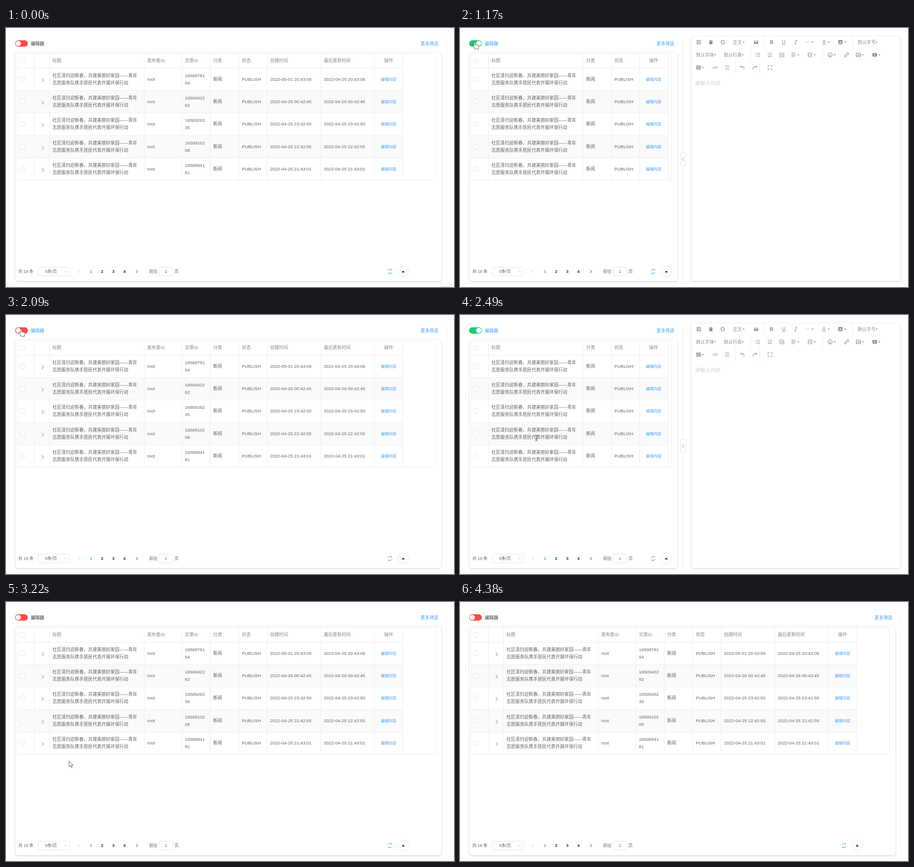
An HTML page that plays this animation: 984 px wide and 569 px high, repeating every 4560 ms.

```html
<!DOCTYPE html>
<html lang="zh">
<head>
<meta charset="utf-8">
<title>文章管理</title>
<style>
html, body { margin: 0; width: 100%; height: 100%; overflow: hidden; background: #fff; }
svg { display: block; width: 984px; height: 569px; font-family: "Liberation Sans", "Noto Sans CJK SC", "Noto Sans CJK", sans-serif; }
text { white-space: pre; }
.card { fill: #fff; stroke: #f0f1f4; stroke-width: .7; filter: drop-shadow(0 1px 1.3px rgba(0,0,0,.2)); }
.grid { fill: none; stroke: #ebeef5; }
.box { fill: #fff; stroke: #dcdfe6; stroke-width: .8; }
.line { fill: none; stroke-width: 1; }
.icons { fill: none; stroke: #8c8c8c; stroke-width: 1.1; }
.icons .solid { fill: #8c8c8c; stroke: none; }
.pointer { fill: #fff; stroke: #444; stroke-width: .9; stroke-linejoin: round; }
</style>
</head>
<body>
<svg id="stage" viewBox="0 0 984 569"></svg>
<script>
const LOOP = 4560;
const BODY = '#606266', HEAD = '#85888e', BLUE = '#409eff', DARK = '#303133', PALE = '#c0c4cc';
const TITLE = ['社区清扫迎新春，共建美丽好家园——青年', '志愿服务队携手居民代表开展环保行动'];
const ROWS = [
  ['1650878154', '2022-05-01 20:43:09', '2022-04-25 20:43:06'],
  ['1650942262', '2022-04-26 00:42:45', '2022-04-26 00:42:45'],
  ['1650926235', '2022-04-25 23:42:50', '2022-04-25 23:42:50'],
  ['1650910208', '2022-04-25 22:42:55', '2022-04-25 22:42:55'],
  ['1650894181', '2022-04-25 21:43:01', '2022-04-25 21:43:01']
];
const rowTop = i => 88 + Math.round(i * 49.2);

// Markup helpers
const text = (x, mid, str, { size = 9.8, fill = BODY, anchor = 'start', weight = 400, style = 'normal' } = {}) =>
  `<text x="${x}" y="${mid + size * .37}" font-size="${size}" fill="${fill}" text-anchor="${anchor}" font-weight="${weight}" font-style="${style}">${str}</text>`;
const rect = (x, y, w, h, cls, r = 0) => `<rect class="${cls}" x="${x}" y="${y}" width="${w}" height="${h}" rx="${r}"/>`;
const path = (d, stroke) => `<path class="line" d="${d}" stroke="${stroke}"/>`;
const chevron = (x, y, dx, dy, stroke) => path(dx
  ? `M${x - dx / 2} ${y - dy}l${dx} ${dy}l${-dx} ${dy}`
  : `M${x - 2.5} ${y - dy / 2}l2.5 ${dy}l2.5 ${-dy}`, stroke);
const caret = (x, y) => `<path class="solid" d="M${x - 2} ${y - 1.3}h4l-2 3z"/>`;

const cells = {
  title: (x, mid) => TITLE.map((s, i) => text(x, mid - 8 + i * 16, s)).join(''),
  user: (x, mid) => text(x, mid, 'root'),
  id: (x, mid, row) => text(x, mid - 8, row[0].slice(0, 8)) + text(x, mid + 8, row[0].slice(8)),
  kind: (x, mid) => text(x, mid, '新闻'),
  state: (x, mid) => text(x, mid, 'PUBLISH'),
  created: (x, mid, row) => text(x, mid, row[1]),
  updated: (x, mid, row) => text(x, mid, row[2]),
  edit: (x, mid) => text(x + 24.3, mid + .3, '编辑内容', { size: 8.4, fill: BLUE, anchor: 'middle' }),
  expand: (x, mid) => chevron(x + 11.7, mid + 2.5, 4, 4, BODY),
  check: (x, mid) => rect(x + .5, mid - 4.5, 9.5, 9.5, 'box', 1.2)
};

// columns: [left edge, cell type, heading]
function table(columns, bodyEnd, end) {
  let out = '', lines = `M24.5 55.5H${end + .5}V334.5H24.5z`;
  [1, 3].forEach(i => out += `<rect x="24" y="${rowTop(i)}" width="${bodyEnd - 24}" height="49" fill="#fafafa"/>`);
  for (let i = 0; i < 5; i++) lines += `M24 ${rowTop(i) + .5}H${bodyEnd}`;
  [...columns.slice(1).map(c => c[0]), bodyEnd].forEach(x => lines += `M${x + .5} 55V334`);
  out += `<path class="grid" d="${lines}"/>`;
  for (const [left, type, heading] of columns) {
    const x = left + 7;
    if (type === 'check') out += cells.check(x, 71.5);
    else if (heading) out += text(type === 'edit' ? x + 24.3 : x, 71.5, heading,
      { fill: HEAD, weight: 500, anchor: type === 'edit' ? 'middle' : 'start' });
    ROWS.forEach((row, i) => out += cells[type](x, rowTop(i) + 24.5, row));
  }
  return out;
}

function footer(buttonX) {
  const small = (x, s, opt) => text(x, 535, s, { size: 9.1, ...opt });
  let out = small(27, '共 18 条') + rect(71, 525.5, 68.5, 19, 'box', 2.5) + small(86, '5条/页')
    + chevron(131, 535, 0, 2.6, PALE) + chevron(160, 535, -3.4, 3.2, PALE) + chevron(287.5, 535, 3.4, 3.2, DARK);
  [1, 2, 3, 4].forEach(n => out += small(162.4 + n * 24.5, n, { weight: 700, anchor: 'middle', fill: n === 1 ? BLUE : DARK }));
  out += small(314.5, '前往') + rect(336, 525.5, 31, 19, 'box', 2.5) + small(351.3, '1', { anchor: 'middle' }) + small(370, '页');
  const x = buttonX - 28.7;
  out += path(`M${x - 4} 534a4 4 0 0 1 7.2 -2.2v-2.3m0 2.3h-2.3M${x + 4} 536a4 4 0 0 1 -7.2 2.2v2.3m0 -2.3h2.3`, BLUE);
  out += `<circle class="box" cx="${buttonX}" cy="535" r="12"/><path d="M${buttonX - 3.5} 537h7l-3.5 -4z" fill="${DARK}"/>`;
  return out;
}

const panel = (right, buttonX, tableMarkup) => rect(20.3, 52.3, right - 20.6, 504, 'card', 6) + tableMarkup
  + footer(buttonX) + text(right - 7.4, 34.3, '更多筛选', { fill: BLUE, anchor: 'end' });

const wide = panel(957, 872.3, table([
  [24, 'check'], [62, 'expand'], [95, 'title', '标题'], [303, 'user', '发布者ID'], [386, 'id', '文章ID'],
  [448, 'kind', '分类'], [511, 'state', '状态'], [573, 'created', '创建时间'], [691, 'updated', '最后更新时间'],
  [809, 'edit', '操作']
], 871, 943)) + path('M967.5 20V556', '#f5f5f6');

const narrow = panel(478, 453.2, table([
  [24, 'check'], [62, 'title', '标题'], [270, 'kind', '分类'], [332, 'state', '状态'], [394, 'edit', '操作']
], 457, 464)) + path('M489.5 20V556', '#eeeff1') + rect(484.5, 273.5, 11.5, 28.5, 'box', 2)
  + chevron(489.7, 288, -4, 4, HEAD) + rect(507.8, 17.3, 460, 538.7, 'card', 5);

function toolbar() {
  const icons = [
    [524.5, 31, 'M-4 -4H2.5L4 -2.5V4H-4zM-2 -4V-1.5H1.5V-4M-2.2 4V1H2.2V4'],
    [577, 31, 'M-3.8 1A3.9 3.9 0 0 1 2.6 -3V-1H4M3.8 -1A3.9 3.9 0 0 1 -2.6 3V1H-4'],
    [737.5, 31, 'M-1 -4H3.5M-3.5 4H1M1.6 -4L-1.4 4'],
    [763, 31, 'M-4 0h1.6m1.6 0h1.6m1.6 0h1.6'],
    [654, 59, 'M-2 -3.5H5M-2 0H5M-2 3.5H5M-5 -3.5h1.6M-5 0h1.6M-5 3.5h1.6'],
    [681, 59, 'M-1.5 -3.5H4.5M-1.5 0H4.5M-1.5 3.5H4.5M-4 -5V-2M-4.6 0h1.4M-4.6 2.4h1.4v2.4h-1.4'],
    [707, 59, 'M4.3 -1V4.3H-4.3V-4.3H2.5M-2 -.5L0 1.7L4.5 -3.7'],
    [733, 59, 'M-5 -4H4.5M-5 -1.3H1.5M-5 1.3H4.5M-5 4H1.5'],
    [769, 59, 'M-5 -4H5M0 -1.3H5M0 1.3H5M-5 4H5M-4.5 -1.5L-2.3 0L-4.5 1.5z'],
    [813, 59, 'M-4.6 0a4.6 4.6 0 1 0 9.2 0a4.6 4.6 0 1 0 -9.2 0M-2.3 1.2Q0 3.6 2.3 1.2M-1.7 -2v1.5M1.7 -2v1.5'],
    [849, 59, 'M-1.5 1.5L1.5 -1.5M-.4 -2.4L1.4 -4.1A1.9 1.9 0 0 1 4.1 -1.4L2.4 .4M.4 2.4L-1.4 4.1A1.9 1.9 0 0 1 -4.1 1.4L-2.4 -.4'],
    [875, 59, 'M-4.8 -4H4.8V4H-4.8zM-4 3L-1 -.5L.8 1.3L2.5 -.7L4.3 2M-3 -2.2h1.4'],
    [524, 87, 'M-4.7 -4H4.7V4H-4.7zM-4.7 -1.4H4.7M-4.7 1.3H4.7M-1.6 -4V4M1.6 -4V4'],
    [560.5, 87, 'M-2.5 -2.5L-4.8 0L-2.5 2.5M2.5 -2.5L4.8 0L2.5 2.5M.8 -3L-.8 3'],
    [587, 87, 'M-4.7 -3.7H4.7M-4.7 0h2.5m1 0h2.5m1 0h2.4M-4.7 3.7H4.7'],
    [621, 87, 'M-4.4 -4V-1H-1.4M-4.2 -1.2A4.4 4.4 0 0 1 2.5 4.2'],
    [647, 87, 'M4.4 -4V-1H1.4M4.2 -1.2A4.4 4.4 0 0 0 -2.5 4.2'],
    [681, 87, 'M-4.4 -1.7V-4.3H-1.7M1.7 -4.3H4.4V-1.7M4.4 1.7V4.3H1.7M-1.7 4.3H-4.4V1.7']
  ].map(([x, y, d]) => `<path transform="translate(${x} ${y})" d="${d}"/>`).join('');
  const solids = [
    [551, 31, 'M-4.2 -3.6H-1.5V-4.6H1.5V-3.6H4.2V-2.4H-4.2zM-3.5 -1.7H3.5V4.6H-3.5z'],
    [650.5, 31, 'M-4.6 4V0Q-4.6 -3 -1 -3.7V-2.4Q-2.6 -2 -2.7 -.2H-.5V4zM.5 4V0Q.5 -3 4.1 -3.7V-2.4Q2.5 -2 2.4 -.2H4.6V4z'],
    [835.5, 31, 'M-4.5 -4.5H4.5V4.5H-4.5z'],
    [911, 59, 'M-5 -2.5Q-5 -3.8 -3.7 -3.8H3.7Q5 -3.8 5 -2.5V2.5Q5 3.8 3.7 3.8H-3.7Q-5 3.8 -5 2.5zM-1.4 -2V2L2 0z']
  ].map(([x, y, d]) => `<path class="solid" fill-rule="evenodd" transform="translate(${x} ${y})" d="${d}"/>`).join('');
  const carets = [[623, 774, 810, 846, 915], [560, 621, 743, 779, 823, 885, 921], [534]]
    .map((xs, i) => xs.map(x => caret(x, 31 + 28 * i)).join('')).join('');
  const gray = { fill: '#8c8c8c' }, letter = { ...gray, anchor: 'middle', size: 10.5 };
  const labels = text(599.5, 31, '正文', gray) + text(873.5, 31, '默认字号', gray)
    + text(518.5, 59, '默认字体', gray) + text(579.5, 59, '默认行高', gray)
    + text(684.5, 31, 'B', { ...letter, weight: 700, size: 11 }) + text(711, 30.3, 'U', letter)
    + text(799.5, 30.3, 'A', letter) + text(835.5, 31, 'A', { ...letter, size: 8, fill: '#fff', weight: 700 });
  const rules = path('M668.5 17V45M862.5 17V45M638.5 45V72M796.5 45V72M604.5 72V100M658.5 72V100', '#ebebeb');
  return rules + `<g class="icons">${icons}${solids}${carets}<path d="M707 35.8h8M795 35.8h9"/></g>` + labels
    + text(515, 120.5, '请输入内容', { size: 11.2, fill: '#cfcfcf', style: 'italic' });
}

document.getElementById('stage').innerHTML = `
  <g id="wide">${wide}</g>
  <g id="narrow">${narrow}</g>
  <g id="toolbar">${toolbar()}</g>
  <g id="hint">${rect(953.5, 562.5, 25, 12, 'box')}${text(966, 571, '截图', { size: 8.4, fill: PALE, anchor: 'middle' })}</g>
  <rect id="track" x="20" y="27" width="28" height="14" rx="7"/>
  <circle id="knob" cx="27" cy="34" r="5.8" fill="#fff"/>
  <g id="label">${text(54.5, 34.3, '编辑器', { weight: 500, fill: 'currentColor' })}</g>
  <g id="cursor">
    <path id="arrow" class="pointer" d="M0 0V13L3 10.5L5 15L7 14L5 9.7H9z"/>
    <path id="hand" class="pointer" d="M-1.5 9V1.2A1.5 1.5 0 0 1 1.5 1.2V5.8L7 7Q9 7.5 8.8 9.7L7.8 13V16H0V14L-5 9.2Q-5.6 7 -3.6 7.2z"/>
    <path id="beam" class="line" stroke="#555" d="M-3 -6h2l1 1l1 -1h2M0 -5V5M-3 6h2l1 -1l1 1h2M-2 2h4"/>
  </g>`;

// Motion: every list is [ms, value]
function play(id, prop, list, easing) {
  const frames = [...list, [LOOP, list[list.length - 1][1]]]
    .map(([ms, value]) => ({ offset: ms / LOOP, [prop]: value, easing }));
  document.getElementById(id).animate(frames, { duration: LOOP, iterations: Infinity });
}
const cut = (id, prop, list) => play(id, prop, list, 'steps(1)');

const clicks = [560, 1230, 2080, 2860];
const toggled = (off, on, delays = [0, 0]) =>
  [[0, off], ...clicks.map((ms, i) => [ms + delays[i % 2], i % 2 ? off : on])];
const eased = (off, on) =>
  [[0, off], ...clicks.flatMap((ms, i) => i % 2 ? [[ms, on], [ms + 300, off]] : [[ms, off], [ms + 300, on]])];

cut('wide', 'opacity', toggled(1, 0, [20, 20]));
cut('narrow', 'opacity', toggled(0, 1, [20, 20]));
cut('toolbar', 'opacity', toggled(0, 1, [60, 20]));
cut('label', 'color', toggled(DARK, BLUE));
cut('hint', 'opacity', [[0, 1], [20, 0]]);
play('track', 'fill', eased('#ff4949', '#13ce66'), 'ease');
play('knob', 'transform', eased('translate(0px)', 'translate(14px)'), 'ease');

const route = [
  [0, 958, 562], [20, 958, 562], [140, 760, 520], [280, 365, 340], [400, 110, 110], [460, 48, 48], [540, 35, 33],
  [1070, 35, 33], [1160, 32.5, 30.5], [1480, 32.5, 30.5], [1580, 110, 105], [1660, 190, 183.3], [1740, 228, 232],
  [1800, 222, 226], [1980, 40, 36], [2060, 33, 31], [2340, 33, 31], [2400, 80, 120], [2490, 168, 269.5],
  [2580, 150, 341], [2660, 140, 330], [2840, 36, 32], [3060, 36, 32], [3140, 90, 230], [3220, 139, 349],
  [3300, 96, 342], [3480, 350, 430], [3720, 744, 465], [3820, 850, 300], [3940, 930, 26], [4060, 960, 200],
  [4180, 968, 532], [4260, 962, 500], [4380, 985, 572]
];
play('cursor', 'transform', route.map(([ms, x, y]) => [ms, `translate(${x}px, ${y}px)`]), 'linear');
const shapes = [
  [0, ''], [20, 'arrow'], [460, 'hand'], [1500, 'arrow'], [1970, 'hand'], [2360, 'arrow'],
  [2450, 'beam'], [2520, 'arrow'], [2810, 'hand'], [3080, 'arrow'], [4380, '']
];
for (const id of ['arrow', 'hand', 'beam']) cut(id, 'opacity', shapes.map(([ms, name]) => [ms, +(name === id)]));
</script>
</body>
</html>
```
